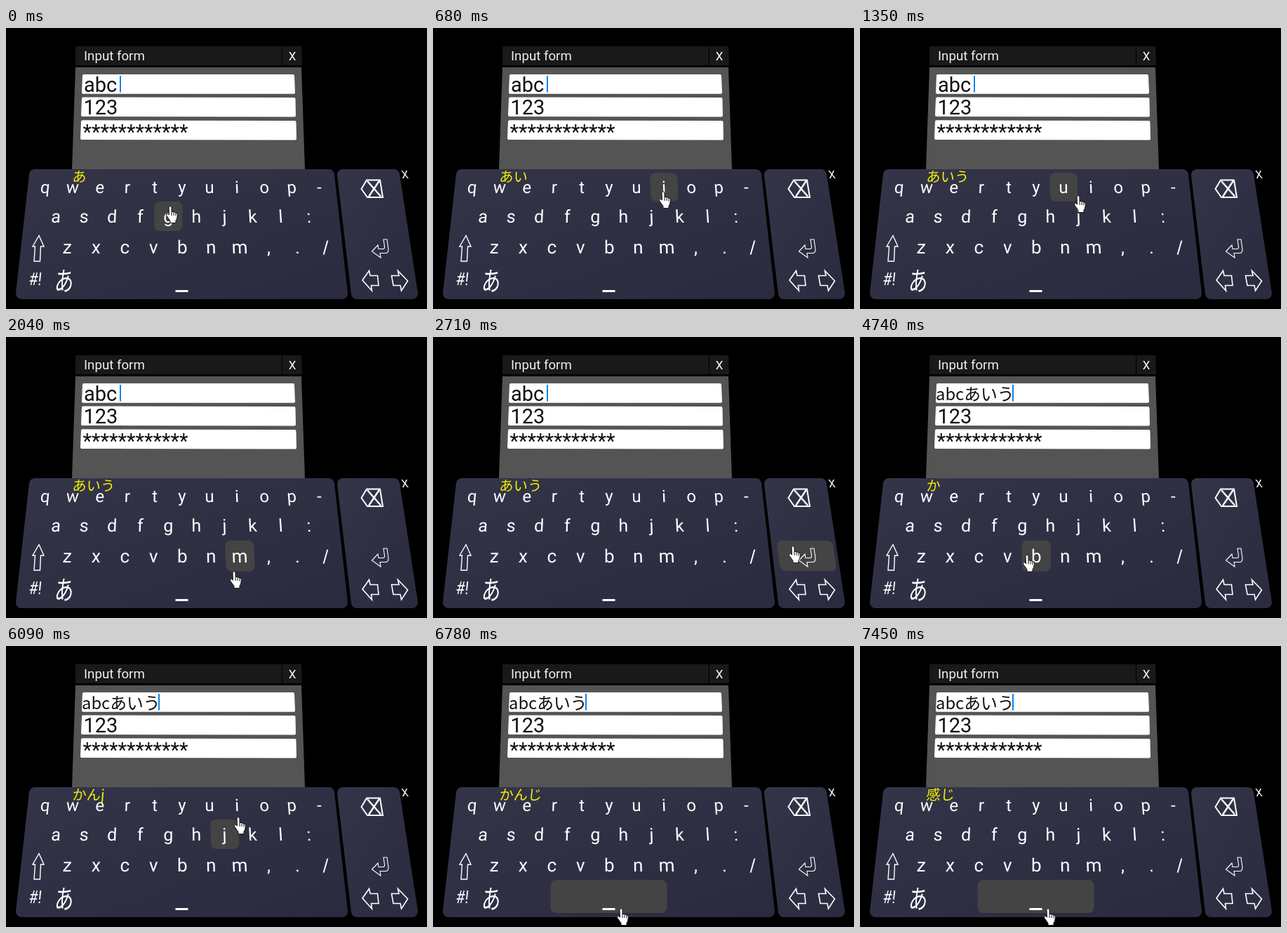
These frames come from a looping animation (600x400 px, 8000 ms). An HTML page:

```html
<!DOCTYPE html>
<html lang="ja">
<head>
<meta charset="utf-8">
<title>Virtual keyboard input</title>
<style>
  html, body { margin: 0; height: 100%; overflow: hidden; background: #000; }
  svg { display: block; width: 600px; height: 400px; font-family: Roboto, sans-serif; fill: #fff; }
  .round { stroke-linejoin: round; }
  .cjk { font-family: "Noto Sans CJK JP", "Noto Sans CJK", sans-serif; }
  .icon { fill: none; stroke: #fff; stroke-width: 1.6; }
</style>
</head>
<body>
<svg viewBox="0 0 600 400">
  <defs>
    <linearGradient id="panel" x2="1" y2="1">
      <stop stop-color="#343449"/><stop offset="1" stop-color="#2b2b40"/>
    </linearGradient>
  </defs>

  <g id="window">
    <path d="M99 26H393V53H99z" fill="#191919"/>
    <path d="M394 26H421L422 53H394z" fill="#191919"/>
    <path d="M99 56H421L426 201H94z" fill="#545454"/>
    <g class="round" stroke="#fff" stroke-width="4">
      <path d="M111 68H409L410 91.700H110z"/>
      <path d="M110 100.500L410.500 101L411 124.500L109 124z"/>
      <path d="M109 133.300L411.500 134L412 157.500L108 157z"/>
    </g>
    <text x="111" y="46" font-size="18.700" fill="#eee">Input form</text>
    <text x="408" y="46" font-size="17" text-anchor="middle">X</text>
    <g fill="#111" font-size="29">
      <text id="latin" x="111" y="91">abc</text>
      <text id="mixed" class="cjk" x="108" y="89.700" font-size="23.800" font-weight="300">abcあいう</text>
      <text x="110.500" y="123">123</text>
      <text x="109.500" y="158">************</text>
    </g>
    <rect id="caret" y="68" width="2" height="23.500" fill="#0a84ee"/>
  </g>

  <g class="round" fill="url(#panel)" stroke="url(#panel)" stroke-width="16">
    <path d="M41 209H460L479 378H22z"/>
    <path d="M480 209H553L579 378H500z"/>
  </g>
  <rect id="hover" rx="8" fill="#444"/>
  <g id="keys" text-anchor="middle"></g>
  <g class="icon">
    <path d="M47 295.500L54 311H49.500L48.500 332H40L41.500 311H38z" stroke-width="1.400"/>
    <path d="M506.500 229L514 216.500H533L537 241H515z" stroke-width="2"/>
    <path d="M515 218L534 239.500M532 217.500L517 240" stroke-width="2.400"/>
    <path d="M538 301H543L545 315Q545 320.500 541 320.500H533L534 327L521.500 318L530 309L531 314.500H537Q540 314.500 539.500 311z"
      stroke-width="1.100"/>
    <path d="M508 359L517.500 345.500L519 352.500H529.500L531 366.500H520.500L521.500 374z"/>
    <path d="M572.500 360L558.500 345.500L560 352.500H549.500L552 366.500H562L563.500 374z"/>
  </g>
  <rect x="241.500" y="373" width="18" height="3"/>
  <text id="compose" class="cjk" font-size="20.200" fill="#f2f200"></text>

  <g id="hand" stroke="#111">
    <path d="M4 2Q6 -.8 8 2V8.500L11 8.500L14 10Q17 10 16.500 13L15.500 19L14 21V24.600H6V21.500L1 14.500Q-.5 11 2 11L4.500 13z"/>
    <path d="M8 8.500V14M11 9V14M14 10V14.500" fill="none"/>
  </g>
</svg>
<script>
const $ = id => document.getElementById(id);

// Key rows: letters, first centre x, pitch, baseline, font size, cell centre y, cell height
const rows = [
  ['qwertyuiop-', 55, 39.2, 235, 24, 226.5, 41],
  ['asdfghjkl:', 70.5, 40.2, 277, 25, 268, 42],
  ['zxcvbnm,./', 86.8, 41.1, 321, 26, 311.5, 44]
];
const cells = {
  shift: [46, 311, 40, 44],
  enter: [532.5, 311.5, 80, 43],
  space: [250.5, 356.5, 166, 47]
};

// Perspective lean grows with the distance from the keyboard's middle
const lean = (x, y, tall = 1) => `matrix(1 0 ${(x - 250) / 2050 * tall} ${tall} ${x} ${y})`;

function label(str, x, y, size, tall, cls = '') {
  $('keys').insertAdjacentHTML('beforeend',
    `<text class="${cls}" font-size="${size}" transform="${lean(x, y, tall)}">${str}</text>`);
}

for (const [letters, x0, pitch, base, size, cy, h] of rows) {
  [...letters].forEach((ch, i) => {
    const x = x0 + i * pitch;
    label(ch, x, base, size);
    cells[ch] = [x, cy, pitch, h];
  });
}
label('#!', 41, 366, 21, 1.2);
label('あ', 82, 374, 27, 1.4, 'cjk');
label('X', 569.3, 214, 15.5);
$('compose').setAttribute('transform', lean(94, 218.5));

// Start time, hovered key, hand x, hand y, composed text
const steps = [
  [0, 'g', 228, 253, 'あ'],
  [340, 'u', 322, 233, 'あ'],
  [680, 'i', 322, 232, 'あい'],
  [1020, 'u', 297, 231, 'あい'],
  [1350, 'u', 305, 238, 'あいう'],
  [1690, 'j', 312, 294, 'あいう'],
  [2040, 'm', 319, 333, 'あいう'],
  [2370, '.', 469, 286, 'あいう'],
  [2710, 'enter', 507, 297, 'あいう'],
  [3050, 'enter', 505, 296, ''],
  [3390, 'k', 344, 268, ''],
  [3730, 'k', 343, 269, 'k'],
  [4070, 'shift', 66, 275, 'k'],
  [4400, 'a', 62, 262, 'k'],
  [4740, 'b', 232, 309.5, 'か'],
  [5080, 'b', 264, 311, 'か'],
  [5420, 'n', 280, 305, 'かn'],
  [5750, 'j', 306, 272, 'かn'],
  [6090, 'j', 325, 243, 'かんj'],
  [6430, 'i', 326, 226, 'かんじ'],
  [6780, 'space', 262, 373, 'かんじ'],
  [7110, 'space', 262, 373, '漢字'],
  [7450, 'space', 262, 373, '感じ']
];
const LOOP = 8000, COMMIT = 3050;

function set(el, attrs) {
  for (const name in attrs) el.setAttribute(name, attrs[name]);
}

function draw(time) {
  const [, key, hx, hy, text] = steps.findLast(s => s[0] <= time);
  const [x, y, w, h] = cells[key];
  set($('hover'), { x: -w / 2, y: -h / 2, width: w, height: h, transform: lean(x, y) });
  set($('hand'), { transform: `translate(${hx} ${hy})` });
  $('compose').textContent = text;

  const committed = time >= COMMIT;
  $('latin').style.display = committed ? 'none' : '';
  $('mixed').style.display = committed ? '' : 'none';
  set($('caret'), { x: committed ? 217 : 162 });
}

const start = performance.now();
function frame() {
  draw((performance.now() - start) % LOOP);
  requestAnimationFrame(frame);
}
frame();
</script>
</body>
</html>
```
